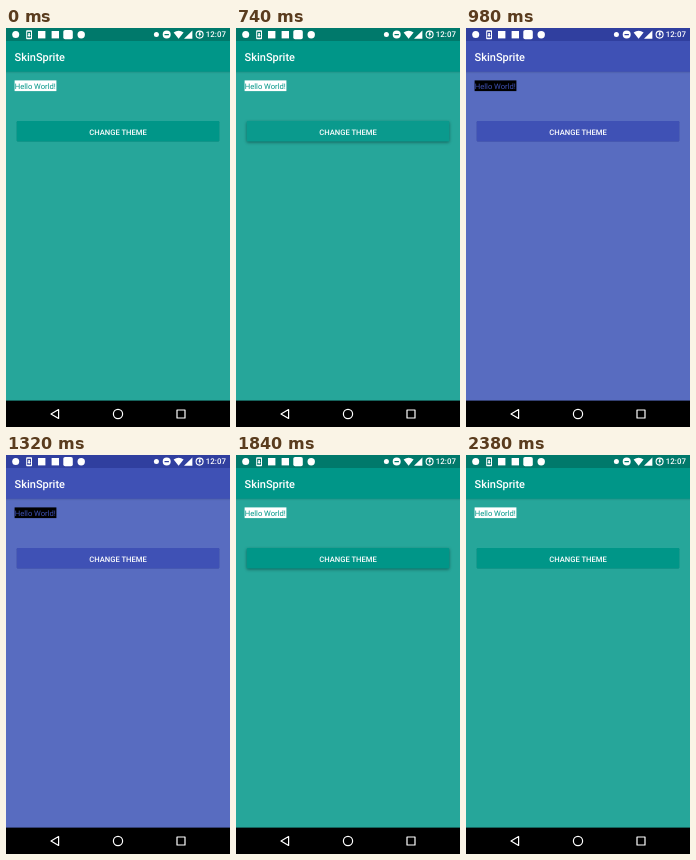
Write an HTML page that moves like this. It is 224 px wide and 399 px high and loops after 2560 ms.

```html
<!DOCTYPE html>
<html lang="en">
<head>
<meta charset="utf-8">
<title>Theme switch</title>
<style>
  html, body { margin: 0; width: 100%; height: 100%; overflow: hidden; background: #000; }
  #stage {
    --dark: #00796b; --main: #009688; --back: #26a69a; --label: #fff;
    display: block; background: var(--back); fill: #fff;
    font: 500 7.63px Roboto, sans-serif; text-rendering: geometricPrecision;
  }
  #stage.indigo { --dark: #303f9f; --main: #3f51b5; --back: #586cc0; --label: #000; }
  .dark { fill: var(--dark); }
  .main { fill: var(--main); }
  .label { fill: var(--label); }
  .title { font-size: 11px; }
  .hello { font-weight: 400; }
  .clock { font-size: 7.9px; text-anchor: end; }
  .caption { text-anchor: middle; }
  .bar { filter: drop-shadow(0 .7px 1px rgba(0, 0, 0, .27)); }
</style>
</head>
<body>
<svg id="stage" width="224" height="399">
  <rect class="main bar" x="-4" y="13" width="232" height="30.7"/>
  <rect class="dark" width="224" height="13"/>
  <text class="title" x="8.6" y="33.1">SkinSprite</text>

  <rect class="label" x="8.6" y="52.4" width="41.8" height="10.7"/>
  <text class="main hello" x="8.7" y="60.6">Hello World!</text>

  <rect id="button" class="main" x="10.7" y="93.1" width="202.6" height="20.5" rx="1.1"/>
  <rect id="ripple" x="10.7" y="93.1" width="202.6" height="20.5" rx="1.1"/>
  <text class="caption" x="112" y="106.6">CHANGE THEME</text>

  <!-- notifications -->
  <circle cx="9.7" cy="6.6" r="3.5"/>
  <path fill-rule="evenodd" d="M21 2.2h4.2q.8 0 .8.8v7.4q0 .8-.8.8H21q-.8 0-.8-.8V3q0-.8.8-.8zM21.2 3.7v6h3.8v-6z"/>
  <path d="M22.3 5h1.6v2h1l-1.8 2-1.8-2h1z"/>
  <rect x="32" y="3" width="7.4" height="7.4"/>
  <rect x="45.6" y="3" width="7.4" height="7.4"/>
  <rect x="57.3" y="2" width="9.5" height="9.3" rx="1.8"/>
  <circle cx="75.2" cy="6.8" r="3.7"/>

  <!-- system -->
  <circle cx="150.4" cy="6.6" r="2.5"/>
  <path fill-rule="evenodd" d="M156.7 6.6a4 4 0 1 0 8 0a4 4 0 1 0-8 0zM158.5 6v1.2h4.4V6z"/>
  <path d="M167.6 4.6Q172.6 .9 177.6 4.6L172.6 10.8z"/>
  <path d="M186.4 2.4v8.4H178z"/>
  <circle cx="193.6" cy="6.6" r="3.5" fill="none" stroke="#fff" stroke-width="1.1"/>
  <path d="M193.1 4.2h1.6l-.4 1.9h.8L193.4 9V7h-.8z"/>
  <text class="clock" x="219.9" y="9.2">12:07</text>

  <!-- navigation -->
  <rect y="372.6" width="224" height="26.4" fill="#000"/>
  <g fill="none" stroke="#fff" stroke-width="1.2" stroke-linejoin="round">
    <path d="M45 386L52.6 381.6V390.4z"/>
    <circle cx="112" cy="386" r="4.6"/>
    <rect x="171" y="382" width="8" height="8"/>
  </g>
</svg>
<script>
const LOOP = 2560;
const taps = [
  { down: 520, swap: 760 },
  { down: 1660, swap: 1840 }
];
const stage = document.getElementById('stage');
const button = document.getElementById('button');
const ripple = document.getElementById('ripple');

const ramp = (t, from, length) => Math.min(1, Math.max(0, (t - from) / length));
const smooth = p => p * p * (3 - 2 * p);
const mix = (a, b, p) => a + (b - a) * p;

function draw(t) {
  let lift = 0, spread = 0;
  for (const { down, swap } of taps) {
    lift += smooth(ramp(t, down, 120)) - smooth(ramp(t, swap + 40, 200));
    if (t >= down && t < swap) spread = 1 - (1 - ramp(t, down, 160)) ** 2;
  }
  stage.classList.toggle('indigo', t >= taps[0].swap && t < taps[1].swap);
  button.style.filter =
    `drop-shadow(0 ${mix(.4, 1.1, lift)}px ${mix(.6, 1.6, lift)}px rgba(0,0,0,${mix(.2, .4, lift)}))`;
  ripple.style.opacity = .04 * spread;
  ripple.style.clipPath = `circle(${110 * spread}px at 50% 50%)`;
}

function tick() {
  draw(performance.now() % LOOP);
  requestAnimationFrame(tick);
}
tick();
</script>
</body>
</html>
```
